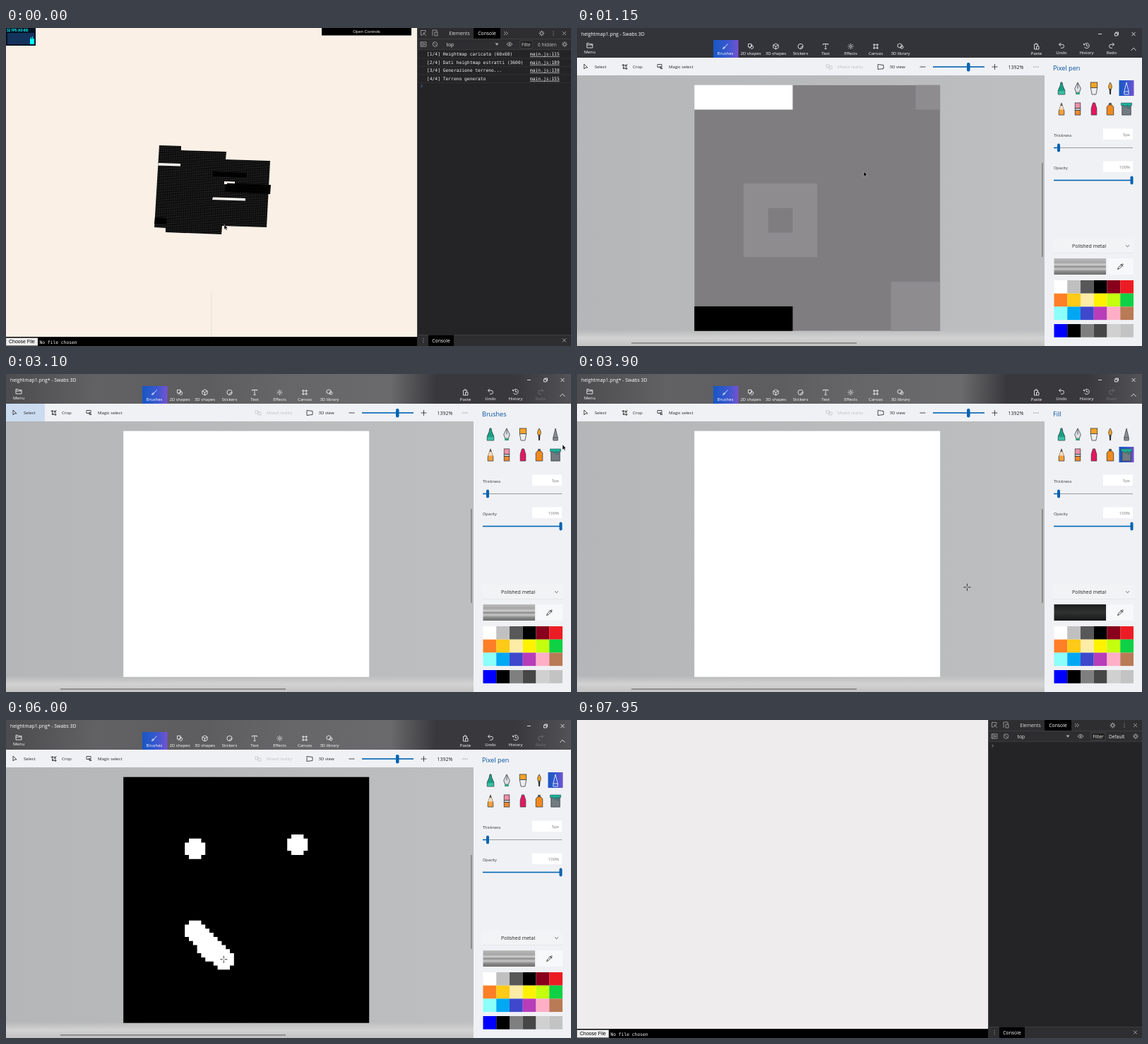
Write an HTML page that moves like this. It is 800 px wide and 450 px high and loops after 8000 ms.

```html
<!DOCTYPE html>
<html lang="en">
<head>
<meta charset="utf-8">
<title>Heightmap editing</title>
<style>
html, body { margin: 0; width: 100%; height: 100%; overflow: hidden; background: #242424; }
svg { display: block; width: 100vw; height: 100vh; }
text { white-space: pre; }
.ui { font-family: "Open Sans", "Noto Sans", sans-serif; }
.mono { font-family: "DejaVu Sans Mono", monospace; font-size: 6.3px; }
.mid { text-anchor: middle; }
.line { fill: none; stroke: currentColor; stroke-width: .8; }
</style>
</head>
<body>
<svg viewBox="0 0 800 450" preserveAspectRatio="none">
  <defs>
    <linearGradient id="accent"><stop stop-color="#1757c4"/><stop offset=".6" stop-color="#3c58cf"/><stop offset="1" stop-color="#7652d0"/></linearGradient>
    <linearGradient id="acrylic" gradientUnits="userSpaceOnUse" x1="0" y1="21" x2="800" y2="40">
      <stop stop-color="#4c4b4d"/><stop offset=".16" stop-color="#626163"/><stop offset=".35" stop-color="#5d5c5e"/>
      <stop offset=".5" stop-color="#666567"/><stop offset=".68" stop-color="#6a696b"/><stop offset=".76" stop-color="#39383c"/>
      <stop offset=".9" stop-color="#39383c"/><stop offset="1" stop-color="#535256"/>
    </linearGradient>
    <linearGradient id="desk"><stop stop-color="#b5b6b7"/><stop offset="1" stop-color="#bdbebf"/></linearGradient>
    <linearGradient id="floor" x2="0" y2="1"><stop stop-color="#d0d0d0" stop-opacity="0"/><stop offset=".5" stop-color="#d2d2d2"/><stop offset="1" stop-color="#c2c2c2"/></linearGradient>
    <linearGradient id="metal" x2="0" y2="1">
      <stop stop-color="#bdbdbd"/><stop offset=".25" stop-color="#a5a5a5"/><stop offset=".4" stop-color="#d0d0d0"/>
      <stop offset=".5" stop-color="#8e8e8e"/><stop offset=".65" stop-color="#c8c8c8"/><stop offset=".8" stop-color="#8a8a8a"/><stop offset="1" stop-color="#6e6e6e"/>
    </linearGradient>
    <linearGradient id="darkMetal" x2="0" y2="1"><stop stop-color="#1c1e1d"/><stop offset=".5" stop-color="#303231"/><stop offset="1" stop-color="#171817"/></linearGradient>
    <pattern id="weave" width="3" height="2.6" patternUnits="userSpaceOnUse" patternTransform="rotate(2)">
      <rect width="3" height="2.6" fill="#0b0b0b"/><rect width="2" height=".8" fill="#353535"/>
    </pattern>
  </defs>
  <g id="browser"></g>
  <g id="editor"></g>
  <path id="arrow" d="M0 0V7.2L1.7 5.7 2.9 8.2 4 7.7 2.9 5.3H5z" fill="#000" stroke="#fff" stroke-width=".4"/>
  <path id="cross" d="M-5 0H-1.5M1.5 0H5M0-5V-1.5M0 1.5V5M-.4 0H.4" stroke="#000" stroke-width=".8"/>
</svg>
<script>
const LOOP = 8000, STEP = 50, CELL = 5.8, LEFT = 166.2, TOP = 80.7;
const $ = id => document.getElementById(id);

const rect = (x, y, w, h, fill, extra = '') => `<rect x="${x}" y="${y}" width="${w}" height="${h}" fill="${fill}" ${extra}/>`;
const text = (x, y, size, str, fill, cls = '', extra = '') =>
  `<text x="${x}" y="${y}" font-size="${size}" fill="${fill}" class="ui ${cls}" ${extra}>${str}</text>`;
const mono = (x, y, str, extra = '') => `<text x="${x}" y="${y}" fill="#f2f2f2" class="mono" ${extra}>${str}</text>`;
const icon = (x, y, d, color = '#fff', extra = '') =>
  `<path class="line" transform="translate(${x} ${y})" d="${d}" style="color:${color}" ${extra}/>`;
const shape = (d, fill, extra = '') => `<path d="${d}" fill="${fill}" ${extra}/>`;

const GEAR = 'M-2 0A2 2 0 1 0 2 0A2 2 0 1 0 -2 0M0-4V-2M0 2V4M-4 0H-2M2 0H4M-2.8-2.8L-1.4-1.4M1.4 1.4L2.8 2.8M-2.8 2.8L-1.4 1.4M1.4-1.4L2.8-2.8';
const CLOSE = 'M-2.5-2.5L2.5 2.5M-2.5 2.5L2.5-2.5';
const DOTS = 'M0-3.2V-2.2M0-.5V.5M0 2.2V3.2';

function browserMarkup() {
  const log = [
    ['Heightmap caricata (60x60)', 115], ['Dati heightmap estratti (3600)', 189],
    ['Generazione terreno...', 138], ['Terreno generato', 155]
  ].map(([msg, line], i) => {
    const y = 39.4 + i * 11.5;
    return mono(596, y, `[${i + 1}/4] ${msg}`) + mono(742, y, `main.js:${line}`, 'text-decoration="underline"') +
      rect(583, y + 3.3, 217, .6, '#3a3a3a');
  }).join('');

  const terrain =
    shape('M217 166L248 167V173L312 175 311 186 374 188 369 282 306 280 305 292 226 289V283L210 282z', 'url(#weave)') +
    shape('M293 203L341 205V212L293 210zM311 219L375 222 374 235 310 232zM211 268L228 269 227 278 210 277z', '#020202') +
    shape('M216 191L247 192V195.5L215 194.5zM293 239.5L339 241V244.5L292 243zM309 217L324 217.5V220L313 219.6V221H309z', '#fdf8f2');

  const stats = rect(0, 0, 42, 25, '#012') + text(1, 5, 4.6, '32 FPS (43-60)', '#0ff', '', 'font-weight="700"') +
    rect(2, 7, 38, 16, '#13335c') + shape('M34 23V15H35V13H36V16H37V12H38V15H40V23z', '#0ff');

  return rect(0, 0, 582, 437, '#faf0e6', 'id="page"') +
    `<g id="scene">${rect(290.5, 375, .7, 62, '#d9d3cb')}${terrain}${stats}
      ${rect(447, 0, 127, 10.5, '#000')}${text(510.5, 7.2, 6, 'Open Controls', '#eee', 'mid', 'style="font-family:\'Liberation Sans\',sans-serif"')}</g>` +
    rect(0, 437, 582, 13, '#000') + rect(0, 438.5, 45, 11, '#efefef', 'stroke="#777" stroke-width=".5"') +
    text(22.5, 446.4, 6.9, 'Choose File', '#000', 'mid', 'style="font-family:\'Liberation Sans\',sans-serif"') + mono(47.5, 446.5, 'No file chosen') +
    rect(582, 0, 218, 450, '#242326') + rect(582, 0, 218, 30.5, '#2e2d30') + rect(582, 0, 1, 450, '#444') +
    rect(583, 15, 217, .6, '#4a4a4a') + rect(583, 30.5, 217, .6, '#4a4a4a') +
    icon(591, 7, 'M3-1V-3.5H-3.5V3H-1M0 0L4 4M0 0V3M0 0H3', '#aaa') +
    icon(607, 7, 'M-3 4V-4H3V-1M0-1H4V4H0z', '#aaa') +
    text(642, 10.2, 6.8, 'Elements', '#ddd', 'mid') + rect(662, 0, 38, 15, '#000') + text(681, 10.2, 6.8, 'Console', '#fff', 'mid') +
    icon(707.5, 7.5, 'M-2.5-2.5L0 0L-2.5 2.5M.5-2.5L3 0L.5 2.5', '#bbb') +
    icon(758.5, 7.5, GEAR, '#bbb') + icon(775, 7.5, DOTS, '#ccc') + icon(790.5, 7.5, CLOSE, '#bbb') +
    icon(591, 23, 'M-4-3.2H4V3.2H-4zM-2-3V3M0-1.5L2.5 0L0 1.5z', '#aaa') +
    icon(607.5, 23, 'M-3.3 0A3.3 3.3 0 1 0 3.3 0A3.3 3.3 0 1 0 -3.3 0M-2.3-2.3L2.3 2.3', '#aaa') +
    text(623.5, 25.6, 6.8, 'top', '#eee') + shape('M692.5 21.5H697.5L695 25z', '#aaa') +
    icon(713, 23, 'M-4 0Q0-5 4 0Q0 5 -4 0M-1 0A1 1 0 1 0 1 0A1 1 0 1 0 -1 0', '#bbb') +
    icon(791, 23, GEAR, '#bbb') +
    `<g id="logged">${rect(728, 18, 17, 10.5, '#222', 'stroke="#555" stroke-width=".5"')}${text(730, 25.8, 6.6, 'Filte', '#ddd')}
      ${text(753, 25.6, 6.5, '6 hidden', '#bbb')}${log}${icon(588.5, 82, 'M-1-1.8L1 0L-1 1.8', '#4a90f0')}</g>` +
    `<g id="cleared">${rect(728, 18, 20, 10.5, '#222', 'stroke="#666" stroke-width=".5"')}${text(738, 25.8, 6.6, 'Filter', '#eee', 'mid')}
      ${text(753, 25.6, 6.6, 'Default', '#eee')}${icon(588.5, 36.5, 'M-1-1.8L1 0L-1 1.8', '#aaa')}</g>` +
    rect(582, 434, 218, 16, '#2e2d30') + rect(583, 434, 217, .6, '#4a4a4a') + icon(591, 442, DOTS, '#ccc') +
    rect(598, 434.5, 36, 15.5, '#000') + text(616, 445, 6.8, 'Console', '#fff', 'mid') + icon(790.5, 442, CLOSE, '#bbb');
}

function tabsMarkup() {
  const tabs = [
    [210, 'Brushes', 'M-3.5 3.5Q-3 0 -.5 1Q0 3 -3.5 3.5M-.5 1L3.5-3.5'],
    [246, '2D shapes', 'M-3.5-3.5H1V1H-3.5zM0-1A2.4 2.4 0 1 1 0 3M-2 3L2-2'],
    [281.5, '3D shapes', 'M0-4L3.6-2V2L0 4L-3.6 2V-2zM-3.6-2L0 0L3.6-2M0 0V4'],
    [316.5, 'Stickers', 'M-3.6 0A3.6 3.6 0 1 1 0 3.6A3.6 3.6 0 0 1 -3.6 0M0 3.6Q0 0 3.6 0'],
    [352, 'Text', 'M-3.5-2V-3.5H3.5V-2M0-3.5V3.5M-1.5 3.5H1.5'],
    [387.5, 'Effects', 'M-1.5 0A1.5 1.5 0 1 0 1.5 0A1.5 1.5 0 1 0 -1.5 0M0-4V-2.7M0 2.7V4M-4 0H-2.7M2.7 0H4M-3-3L-2-2M2 2L3 3M-3 3L-2 2M2-2L3-3'],
    [423, 'Canvas', 'M-2.2-4V4M2.2-4V4M-4-2.2H4M-4 2.2H4'],
    [458, '3D library', 'M-1-4L2-2.5V.5L-1 2L-4 .5V-2.5zM0 1A2 2 0 1 0 4 1A2 2 0 1 0 0 1'],
    [650.5, 'Paste', 'M-3-3H2V0M-3-3V4H0M-1.5-4H1M0 0H3.5V4H0z'],
    [686, 'Undo', 'M-1-4L-3.5-1.5L-1 1M-3.5-1.5H1A2.5 2.5 0 0 1 1 3.5H-1'],
    [721.5, 'History', 'M-3.2-1A3.6 3.6 0 1 1 -3 2M-4-3V-1H-2M0-2V.5H2'],
    [757, 'Redo', 'M1-4L3.5-1.5L1 1M3.5-1.5H-1A2.5 2.5 0 0 0 -1 3.5H1']
  ];
  return tabs.map(([x, label, d]) => {
    const lift = x > 660 ? 1.2 : 0;
    return `<g ${label === 'Redo' ? 'id="redo"' : ''}>${icon(x, 26 - lift, d)}${text(x, 38.2 - lift, 6, label, '#fff', 'mid')}</g>`;
  }).join('');
}

function brushesMarkup() {
  const ink = 'stroke="#30343c" stroke-width=".8"';
  const parts = [
    shape('M-1-9H1L2-4 5 3V9H-5V3L-2-4z', '#16a085', ink) + shape('M-4.5 4H4.5V8.5H-4.5z', '#3cc0a4'),
    shape('M0-9L4.5 0 2.5 6H-2.5L-4.5 0z', '#dce1e6', ink) + rect(-3, 6, 6, 3, '#35a07a') + shape('M0-8V0', 'none', ink),
    rect(-5, -9, 10, 8, '#f4a325', ink) + shape('M-5-1H5L3 9H-3z', '#eceef0', ink),
    shape('M0-9Q4-3 1.5 1H-1.5Q-4-3 0-9', '#f5a623', ink) + shape('M-1.5 1H1.5L1 9H-1z', '#30343c'),
    '',
    shape('M0-9L4 3V9H-4V3z', '#f4a03a', ink) + shape('M0-9L3.4 1H-3.4z', '#f1dcc0') + shape('M0-9L1.5-5H-1.5z', '#3a3d44'),
    rect(-4, -9, 8, 8, '#f48fa8', ink) + rect(-4, -1, 8, 3, '#c8ced4', ink) + rect(-4, 2, 8, 7, '#ee8a2a', ink),
    shape('M-1.5-9H1.5L4-1V9H-4V-1z', '#e8175d', ink),
    rect(-2, -9, 4, 3, '#555b63') + shape('M-2.5-6H2.5L5-3V9H-5V-3z', '#f28a1c', ink),
    rect(-6.5, -8, 13, 17, '#737b82', ink) + shape('M-8-9H8V-5H4V-1H2V-5H0V-3H-3V-5H-8z', '#19b29a', 'stroke="#30343c" stroke-width=".5"')
  ];
  return parts.map((p, i) => `<g transform="translate(${686 + i % 5 * 23} ${i < 5 ? 85.5 : 114.5}) scale(.95)">${p}</g>`).join('');
}

function sidebarMarkup() {
  const palette = [
    '#fff #c0c0c0 #585858 #000 #88001b #ec1c24', '#ff7f27 #ffca18 #fdeca6 #fff200 #c4ff0e #0ed145',
    '#8cfffb #00a8f3 #3f48cc #b83dba #ffaec8 #b97a56', '#00f #000 #7f7f7f #464646 #d0d0d0 #c3c3c3'
  ].map((row, r) => row.split(' ').map((c, i) => rect(675.5 + i * 18.75, r < 3 ? 357 + r * 18.7 : 419, 18.75, 18.7, c)).join('')).join('');
  const slider = (y, label, value, knob) =>
    text(675, y - 15.5, 5.6, label, '#333') + rect(745, y - 27, 42, 15.5, '#fff') +
    text(783, y - 17, 6, value, '#777', '', 'text-anchor="end"') +
    rect(675, y - .5, 112, 1, '#999') + rect(675, y - .8, knob - 675, 1.6, '#0063b1') + rect(knob - 2, y - 6, 4, 12, '#0063b1', 'rx="2"');

  return rect(662, 42, 138, 408, '#f0f1f4') +
    text(674, 60, 9.1, '', '#0050a0', '', 'id="toolName"') +
    rect(767.5, 74, 21, 22, 'url(#accent)', 'id="highlight"') + brushesMarkup() +
    `<path id="pixelPen" transform="translate(778 86)" d="M0-9L3.2 4V8H-3.2V4zM-3.2 4H3.2" stroke-width=".8"/>` +
    slider(169.5, 'Thickness', '5px', 682) + slider(215.5, 'Opacity', '100%', 785.5) +
    rect(674, 298, 115, 20.5, '#f2f3f5') + rect(674, 318, 115, .5, '#dcdde0') + text(701, 311, 7, 'Polished metal', '#222') +
    icon(779.5, 308.5, 'M-2.5-1.2L0 1.2L2.5-1.2', '#444') +
    rect(675.5, 326, 73.5, 23, '', 'id="swatch"') + rect(751, 326, 37, 23, '#f7f8fa') +
    icon(769.5, 337.5, 'M-4 4L-3 1.5L1-2.5L2.5-1L-1.5 3zM0-3.5L3.5 0M1.5-2.5L3-4L4-3L2.5-1.5', '#222') +
    palette;
}

function editorMarkup() {
  const cells = [[0, 0, 60, 60, 0], [0, 0, 24, 6, '#fff'], [54, 0, 6, 6, 1], [12, 24, 18, 18, 1], [18, 30, 6, 6, 0], [48, 48, 12, 12, 1], [0, 54, 24, 6, '#000']]
    .map(([x, y, w, h, c]) => rect(x, y, w, h, ['#7f7d80', '#8e8c8f'][c] || c)).join('');

  return rect(0, 0, 662, 450, 'url(#desk)') + rect(0, 427, 662, 23, 'url(#floor)') +
    rect(77, 445, 319, 1.7, '#858585') + rect(658, 191, 1.7, 133, '#858585') +
    `<g transform="translate(${LEFT} ${TOP}) scale(${CELL})">${rect(0, 0, 60, 60, '#fff', 'id="sheet"')}<g id="heights">${cells}</g><path id="strokes" fill="#fff"/></g>` +
    rect(0, 0, 800, 42, '#33333a') + rect(0, 0, 800, 42, 'url(#acrylic)', 'id="titleGlow"') +
    text(6, 11, 6.9, '', '#fff', '', 'id="title"') +
    icon(740.5, 8.5, 'M-2.5 0H2.5') + icon(764, 8.5, 'M-2.5-1.2H1.2V2.5H-2.5zM-1.2-1.2V-2.5H2.5V1.2H1.2') + icon(788, 8.5, CLOSE) +
    icon(18, 25, 'M-4-3.5H-1L0-2.3H4V3H-4zM-4-1H4') + text(18, 36.2, 6, 'Menu', '#fff', 'mid') +
    rect(193, 17, 35.5, 25, 'url(#accent)') + tabsMarkup() + icon(788, 30, 'M-3.5 1.8L0-1.8L3.5 1.8') +
    rect(0, 42, 800, 25, '#f0f1f4') + rect(0, 42, 55, 25, '#cbdcf0', 'id="selectOn"') +
    icon(12, 55, 'M-2-4V3L0 1L3 1z', '#222') + text(25, 57.2, 6.1, 'Select', '#222') +
    icon(67.5, 55, 'M-2-4V2.5H4M-4-2.5H2.5V4M-2 2.5L4-4', '#222') + text(79, 57.2, 6.1, 'Crop', '#222') +
    icon(118, 54.5, 'M-4-3H2V1H-4zM-1-1L3 3M0 0V3H3', '#222') + text(130, 57.2, 6.1, 'Magic select', '#222') +
    icon(357, 55, 'M-4-3H0V1H-4zM0-1H4V3H0z', '#c4c5c8') + text(369, 57.2, 6.1, 'Mixed reality', '#c0c1c4') +
    icon(430, 55, 'M-4-3.5L4-2.5V2.5L-4 3.5z', '#222') + text(442.5, 57.2, 6.1, '3D view', '#222') +
    icon(489.5, 55, 'M-4 0H4', '#222') + rect(504, 54.2, 73, 1.6, '#0063b1') + rect(552, 49, 4.5, 12.5, '#0063b1', 'rx="2"') +
    icon(591.5, 55, 'M-4 0H4M0-4V4', '#222') + text(610.5, 57.6, 7, '1392%', '#222') + icon(650, 55, 'M-3.5 0H-2.5M-.5 0H.5M2.5 0H3.5', '#222') +
    sidebarMarkup();
}

$('browser').innerHTML = browserMarkup();
$('editor').innerHTML = editorMarkup();

// Event times in ms
const OPEN = 800, CLEAR = 2700, PICK_FILL = 3250, PICK_BLACK = 3700, FILL = 4050, PICK_PEN = 4400, PICK_WHITE = 4800;
const EYE_1 = 5100, EYE_2 = 5450, MOUTH = 5800, MOUTH_END = 6600, SAVE = 6850, BACK = 7500, RELOAD = 7750;

const mouthPoints = [[17, 37], [19, 39], [20, 41], [26, 45], [34, 45], [40, 43], [42, 41], [45, 37], [46, 35], [48, 33]];
const mouth = [mouthPoints[0]];
mouthPoints.slice(1).forEach(([x, y], i) => {
  const [px, py] = mouthPoints[i], n = Math.max(Math.abs(x - px), Math.abs(y - py));
  for (let k = 1; k <= n; k++) mouth.push([Math.round(px + (x - px) * k / n), Math.round(py + (y - py) * k / n)]);
});
const stamp = ([x, y]) => `M${x - 1} ${y - 2}h3v1h1v3h-1v1h-3v-1h-1v-3h1z`;
const toStage = ([x, y]) => [LEFT + (x + .5) * CELL, TOP + (y + .5) * CELL];
const eyes = [[17, 17], [42, 16]];

const route = [
  [0, 309, 278], [350, 309, 278], [1150, 406, 203], [1550, 407, 205], [2250, 646, 146], [2650, 646, 146], [3100, 788, 100],
  [PICK_FILL, 777, 114], [PICK_BLACK, 741, 366], [FILL, 430, 260], [PICK_PEN, 778, 88], [4700, 695, 354], [PICK_WHITE, 686, 366],
  [EYE_1, ...toStage(eyes[0])], [EYE_2, ...toStage(eyes[1])], [MOUTH, ...toStage(mouth[0])],
  [MOUTH_END, ...toStage(mouth[mouth.length - 1])], [SAVE, 474, 312], [LOOP, 474, 312]
];
const clamp = v => Math.min(1, Math.max(0, v));

function pointer(t) {
  if (t > MOUTH && t < MOUTH_END)
    return toStage(mouth[Math.floor((t - MOUTH) / (MOUTH_END - MOUTH) * (mouth.length - 1))]);
  const i = route.findIndex(p => p[0] > t), [t0, x0, y0] = route[i - 1], [t1, x1, y1] = route[i];
  const u = (t - t0) / (t1 - t0), e = u * u * (3 - 2 * u);
  return [x0 + (x1 - x0) * e, y0 + (y1 - y0) * e];
}

const show = (id, on) => { $(id).style.display = on ? '' : 'none'; };

function draw(t) {
  const editing = t >= OPEN && t < BACK, reloaded = t >= RELOAD;
  show('editor', editing);
  show('scene', !reloaded);
  show('logged', !reloaded);
  show('cleared', reloaded);
  $('page').setAttribute('fill', reloaded ? '#eeecec' : '#faf0e6');

  const cleared = t >= CLEAR, noTool = cleared && t < PICK_FILL, filling = t >= PICK_FILL && t < PICK_PEN;
  $('titleGlow').setAttribute('opacity', clamp((t - 1200) / 400));
  $('title').textContent = `heightmap1.png${cleared && t < SAVE ? '*' : ''} - Swabs 3D`;
  $('toolName').textContent = noTool ? 'Brushes' : filling ? 'Fill' : 'Pixel pen';
  $('redo').setAttribute('opacity', cleared ? .25 : 1);
  show('selectOn', noTool);
  show('highlight', !noTool);
  $('highlight').setAttribute('y', filling ? 103 : 74);
  const penOn = !noTool && !filling;
  $('pixelPen').setAttribute('fill', penOn ? 'none' : '#8b9097');
  $('pixelPen').setAttribute('stroke', penOn ? '#fff' : '#3a3e46');
  $('swatch').setAttribute('fill', t >= PICK_BLACK && t < PICK_WHITE ? 'url(#darkMetal)' : 'url(#metal)');

  show('heights', !cleared);
  $('sheet').setAttribute('fill', t >= FILL ? '#000' : '#fff');
  const drawn = Math.floor(clamp((t - MOUTH) / (MOUTH_END - MOUTH)) * (mouth.length - 1)) + 1;
  const dabs = [...(t >= EYE_1 ? [eyes[0]] : []), ...(t >= EYE_2 ? [eyes[1]] : []), ...(t >= MOUTH ? mouth.slice(0, drawn) : [])];
  $('strokes').setAttribute('d', dabs.map(stamp).join(''));

  const [x, y] = pointer(t), crosshair = editing && t > 1550 && x < 662 && y > 67;
  show('cross', crosshair);
  show('arrow', !crosshair && t < BACK);
  for (const id of ['cross', 'arrow']) $(id).setAttribute('transform', `translate(${x} ${y})`);
}

const start = performance.now();
function tick() {
  const t = (performance.now() - start) % LOOP;
  draw(Math.floor(t / STEP) * STEP);
  requestAnimationFrame(tick);
}
tick();
</script>
</body>
</html>
```
